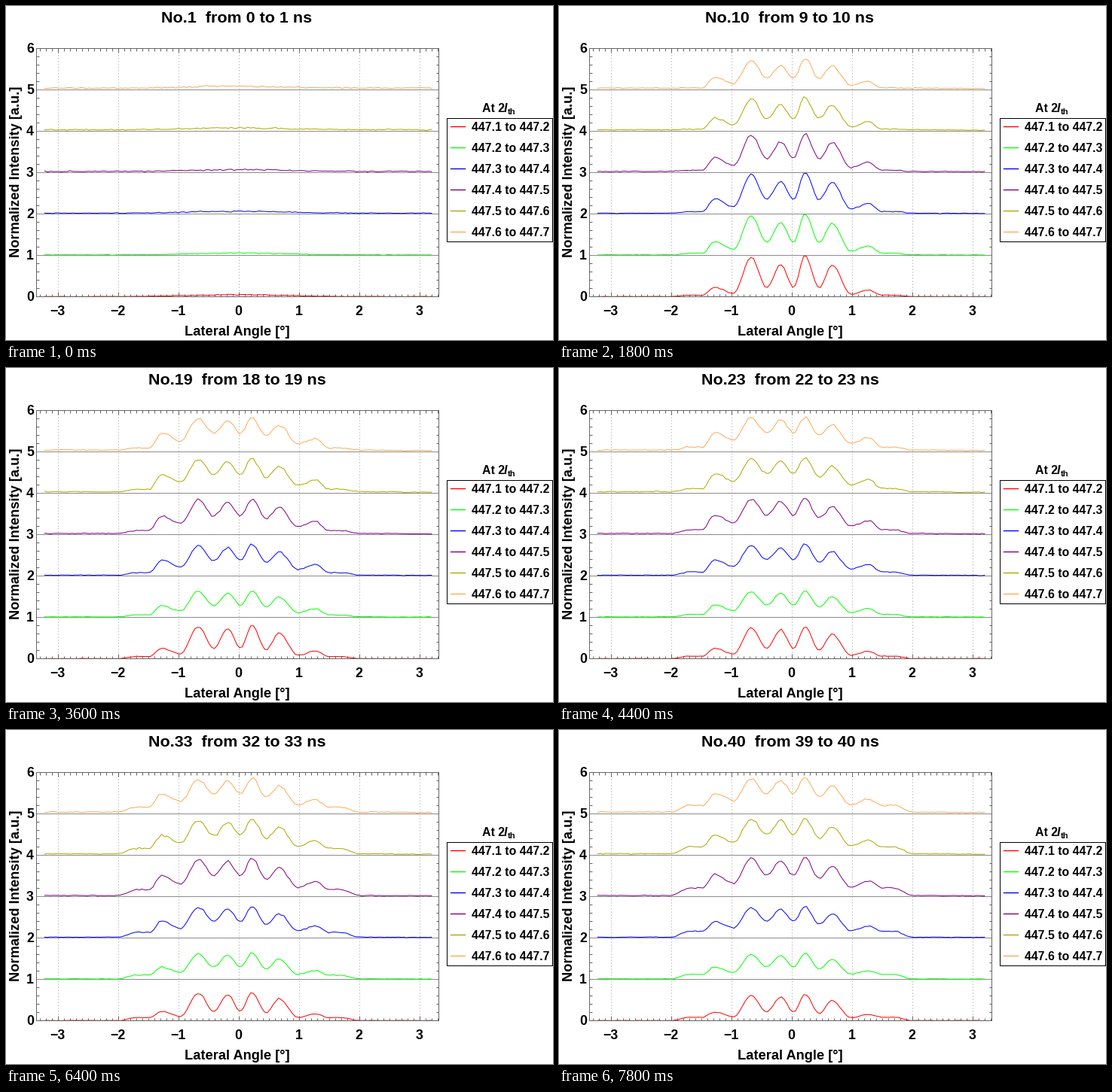
Animation, 726 px wide and 444 px high, one loop 8000 ms. Source, as a matplotlib script:

```python
import numpy as np
import matplotlib.pyplot as plt
from matplotlib.animation import FuncAnimation

W, H, DPI = 726, 444, 100
FRAMES, INTERVAL = 40, 200
COLORS = ["#ff0000", "#00ff00", "#0000ff", "#800080", "#aaaa00", "#ffaa55"]
GRAY = "#666666"
ANGLE = np.linspace(-3.22, 3.2, 140)

# Lobe positions and relative heights just after turn-on and once settled
LOBES = np.array([-1.7, -1.28, -.67, -.18, .22, .67, 1.27, 1.7])
YOUNG = np.array([.06, .40, .96, .79, 1, .77, .28, .06])
SETTLED = np.array([.06, .57, .97, .92, 1, .77, .41, .06])
# Main-lobe height of each band at 15 and 40 ns
MID = [.84, .65, .76, .85, .84, .83]
END = [.63, .63, .76, .95, .89, .88]


def pt(px):
    return px * 72 / DPI


def smooth(t):
    t = np.clip(t, 0, 1)
    return t * t * (3 - 2 * t)


def ease_through(x, xs, ys):
    """Curve through key points with a flat tangent at each of them."""
    k = np.clip(np.searchsorted(xs, x) - 1, 0, len(xs) - 2)
    t = smooth((x - xs[k]) / (xs[k + 1] - xs[k]))
    return ys[k] + (ys[k + 1] - ys[k]) * t


def pattern(i, band, floor):
    """Far-field lobes with troughs between neighbouring crests."""
    settle = 1 - np.exp(-max(i - 9, 0) / 5)
    fill = 1 - .42 * np.exp(-.9 * band)
    crest = YOUNG + (SETTLED - YOUNG) * settle
    crest[[0, -1]] += .17 * max(i - 9, 0) / 30
    crest[[0, 1, -2, -1]] *= fill
    trough = np.minimum(crest[:-1], crest[1:])
    trough[1:-1] *= (.47 + .14 * settle) * np.sqrt(fill)
    trough[2:-2] *= np.sqrt(fill)

    start = 1 - .24 * smooth((band - 2) / 3)
    scale = np.interp(i, [9, 14, 39], [start, MID[band], END[band]])
    xs, ys = np.empty(15), np.empty(15)
    xs[::2], xs[1::2] = LOBES, (LOBES[:-1] + LOBES[1:]) / 2 + .01
    ys[::2], ys[1::2] = crest, trough
    ys = np.maximum(ys * scale, floor)
    xs = np.r_[-3.3, -2.0, xs, 2.0, 3.3]
    return ease_through(ANGLE, xs, np.r_[floor, floor, ys, floor, .7 * floor])


def spectrum(i, band):
    rng = np.random.default_rng(100 * i + band)
    floor = .003 + .008 * band
    glow = floor + .045 * np.exp(-(ANGLE / 1.1) ** 2)
    on = smooth((i - .5) / 6.5)
    y = glow + (pattern(i, band, floor) - glow) * on
    grain = .002 + (.008 + .002 * band) * np.sqrt(y) + .05 * (1 - on) * glow
    return np.maximum(y + grain * rng.standard_normal(ANGLE.size), 0)


fig = plt.figure(figsize=(W / DPI, H / DPI), dpi=DPI, facecolor="white")


def label(x, y, text, size, ha="center", **kw):
    """Text whose capitals are centred on pixel row y."""
    style = dict(family="Liberation Sans", weight="bold", color="black")
    style.update(kw)
    return fig.text(x / W, 1 - (y + .36 * size) / H, text, fontsize=pt(size),
                    ha=ha, va="baseline", **style)


def stroke(xs, ys, color, width):
    fig.add_artist(plt.Line2D(np.array(xs) / W, 1 - np.array(ys) / H,
                              color=color, lw=pt(width)))


# Plot area
L, R, T, B = 40.4, 574.4, 56.4, 386.4
ZERO, UNIT = 308.9, 80
ax = fig.add_axes([L / W, 1 - B / H, (R - L) / W, (B - T) / H])
ax.set_xlim((L - ZERO) / UNIT, (R - ZERO) / UNIT)
ax.set_ylim(0, 6)
ax.set_facecolor("none")
ax.set_axisbelow(True)
ax.set_xticks(range(-3, 4))
ax.set_yticks(range(7))
ax.set_xticks(np.arange(-33, 34) / 10, minor=True)
ax.set_yticks(np.arange(31) / 5, minor=True)
for which, size in (("major", 6), ("minor", 3.5)):
    ax.tick_params(which=which, direction="in", length=pt(size), width=pt(1),
                   color=GRAY, top=True, right=True,
                   labelbottom=False, labelleft=False)
for spine in ax.spines.values():
    spine.set(linewidth=pt(1), edgecolor=GRAY)
for x in range(-3, 4):
    ax.axvline(x, color="#999999", lw=pt(1), ls=(0, (1, 3)), zorder=.5)
for y in range(1, 6):
    ax.axhline(y, color="#8c8c8c", lw=pt(1), zorder=.6)

for x in range(-3, 4):
    label(308.4 + UNIT * x, 404.5, str(x).replace("-", "\u2212"), 17.8)
for y in range(7):
    label(37, 385.6 - 55 * y, str(y), 17.8, ha="right")
label(307, 431.3, "Lateral Angle [°]", 18.3)
fig.text(18 / W, 1 - 220.5 / H, "Normalized Intensity [a.u.]", rotation=90,
         rotation_mode="anchor", ha="center", va="baseline",
         family="Liberation Sans", weight="bold", fontsize=pt(18.3))
title = label(306.5, 14.5, "", 21.5)

# Legend
label(631.5, 135, "At 2", 15.9, ha="left")
label(661, 135, "I", 15.9, ha="left", style="italic")
label(666, 140, "th", 11.2, ha="left")
stroke([585.4, 725.4, 725.4, 585.4, 585.4],
       [149.4, 149.4, 313.4, 313.4, 149.4], "black", 1)
for n, color in enumerate(COLORS):
    y = 160.4 + 28 * n
    stroke([590, 609], [y, y], color, 1.4)
    label(617.5, y, f"447.{n + 1} to 447.{n + 2}", 15.8, ha="left")

curves = [ax.plot([], [], color=c, lw=pt(1), zorder=3)[0] for c in COLORS]


def update(i):
    title.set_text(f"No.{i + 1}  from {i} to {i + 1} ns")
    for band, curve in enumerate(curves):
        curve.set_data(ANGLE, band + spectrum(i, band))
    return [title, *curves]


anim = FuncAnimation(fig, update, frames=FRAMES, interval=INTERVAL,
                     init_func=lambda: update(0), repeat=True, repeat_delay=0)
plt.show()
```
